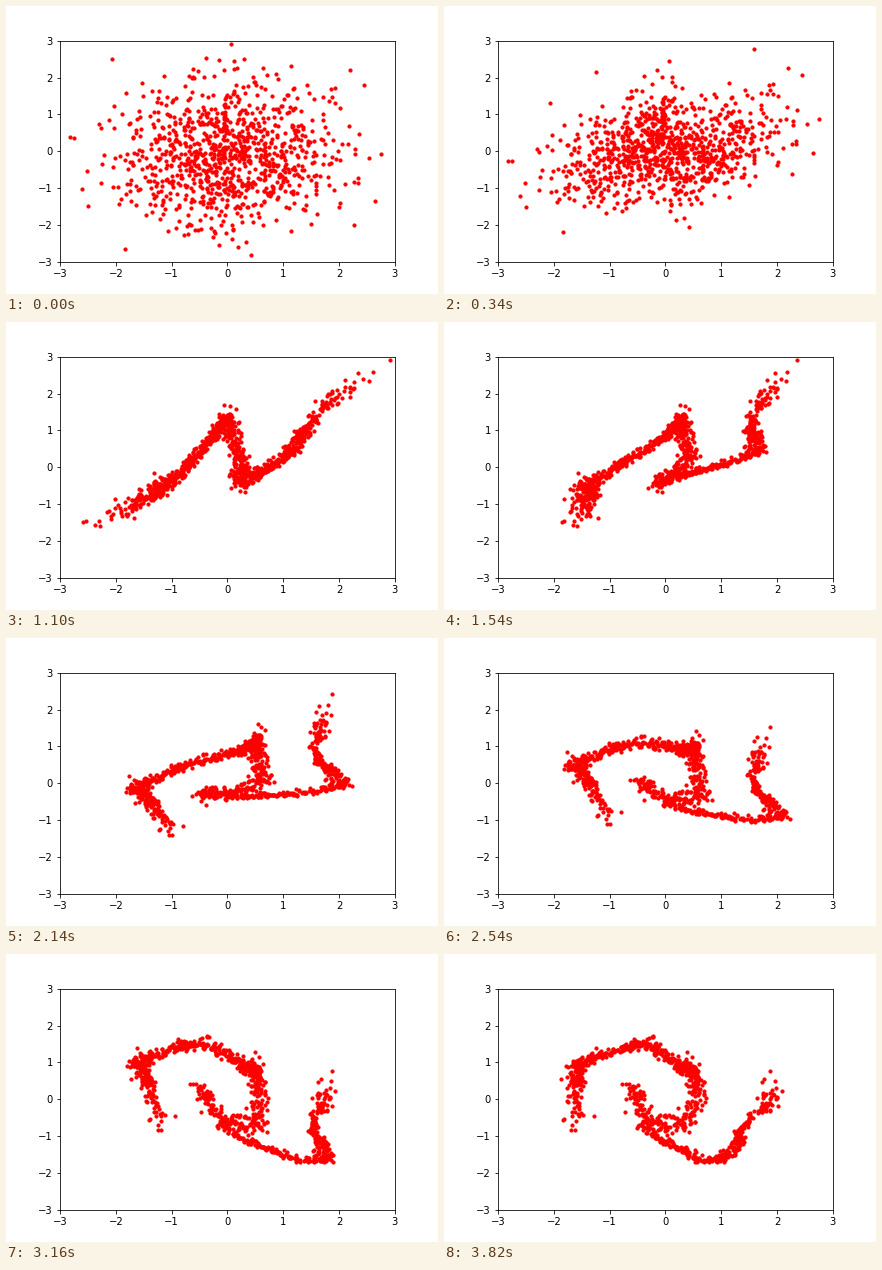
Animation of 432x288 px, one loop 3840 ms. Source, as a matplotlib script:

```python
import numpy as np
import matplotlib.pyplot as plt
from matplotlib.animation import FuncAnimation

STEPS = 48  # frames per coupling layer
COUNT = 1000

# Far samples added to the random core
FAR_X = [-2.82, -2.75, -2.6, -2.5, -2.07, -1.83, -1.24, .07,
         .43, 1.58, 2.2, 2.27, 2.45, 2.65, 2.75, 3.1]
FAR_Y = [.4, .37, -1.02, -1.48, 2.5, -2.64, 3.4, 2.9,
         -2.8, 3.3, 2.2, -2, 1.8, -1.35, -.08, 0]


def bump(u, mid, width):
    return np.exp(-((u - mid) / width) ** 2)


def curve(u, xs, ys):
    """Piecewise linear curve with slightly rounded corners."""
    return sum(np.interp(u + d, xs, ys) for d in (-.05, 0, .05)) / 3


def scale1(x):
    return .13 + .2 * bump(x, .08, .2)


def shift1(x):
    return curve(x,
                 [-3, -2, -1, -.75, -.5, -.22, -.1, .1, .25, .42, .6, 1.8, 3.1],
                 [-1.6, -1.16, -.41, -.07, .48, 1.23, 1.27, .52, -.1, -.32,
                  -.15, 1.72, 2.93])


def scale2(y):
    return .55 + 1.05 * bump(y, .3, .62)


def shift2(y):
    return curve(y, [-1.5, -1, -.52, -.3, 0, .4, .9, 1.7, 3],
                 [.38, -.33, -.8, -.6, -.03, .47, .56, .64, .13])


def scale3(x):
    return curve(x, [-1.5, -1.1, -.7, -.3, 0, .5, 1.7],
                 [1.15, 1.5, 1.15, 1.8, 2.05, 1.37, .93])


def shift3(x):
    return curve(x, [-2, -1.1, -.5, -.3, 0, .5, 1, 1.5, 2.3],
                 [1.6, 1.47, 1.04, .63, -.2, -.98, -1.4, -1.82, -2.1])


def scale4(y):
    return 1.22 - .21 * (y + .2) ** 2


def shift4(y):
    return -.35 + .32 * np.tanh(1.6 * (y + .5))


rng = np.random.default_rng(7)
core = rng.standard_normal((2 * COUNT, 2))
core = core[np.hypot(*core.T) < 2.6][:COUNT - len(FAR_X)]
x0, y0 = np.vstack([core, np.column_stack([FAR_X, FAR_Y])]).T

# Coupling layers: y and x are moved in turn, each depending on the other
y1 = y0 * scale1(x0) + shift1(x0)
x1 = x0 * scale2(y1) + shift2(y1)
y2 = y1 * scale3(x1) + shift3(x1)
x2 = x1 * scale4(y2) + shift4(y2)
pairs = (x0, y0), (x0, y1), (x1, y1), (x1, y2), (x2, y2)
stages = [np.column_stack(p) for p in pairs]

fig, ax = plt.subplots(figsize=(6, 4), dpi=72)
ax.set_xlim(-3, 3)
ax.set_ylim(-3, 3)
dots = ax.scatter(x0, y0, s=10, color='red')


def animate(i):
    layer, step = divmod(i, STEPS)
    t = step / STEPS
    dots.set_offsets((1 - t) * stages[layer] + t * stages[layer + 1])
    return dots,


anim = FuncAnimation(fig, animate, frames=STEPS * (len(stages) - 1),
                     interval=20, repeat=True, repeat_delay=0)
plt.show()
```
